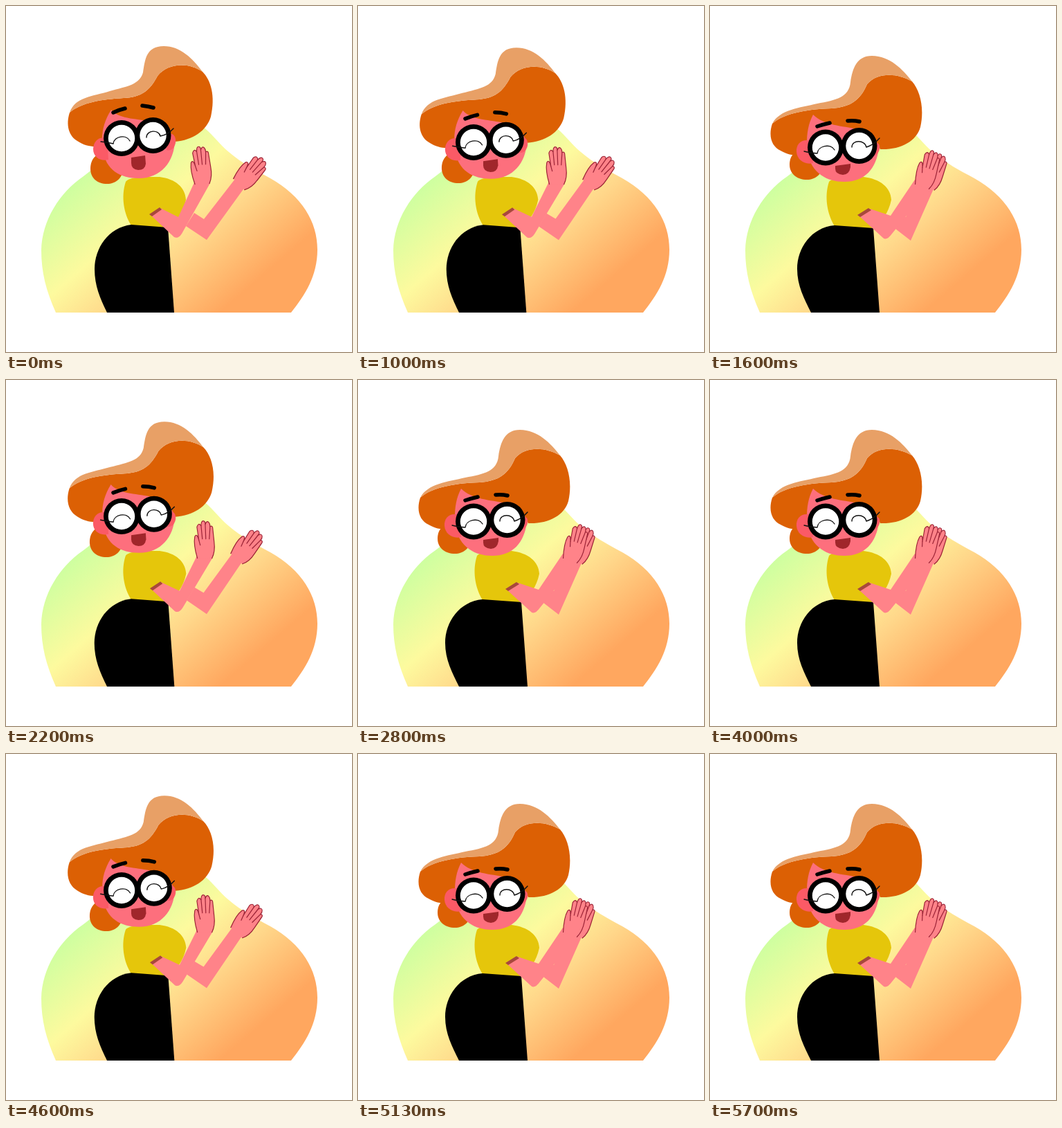
Recreate the animation shown at these times as an HTML page. Size 500 px wide and 500 px high, loop 5.73 s.

```html
<!DOCTYPE html>
<html>
<head>
<meta charset="utf-8">
<style>
html, body { margin: 0; width: 100%; height: 100%; overflow: hidden; background: #fff; }
svg { display: block; width: 100%; height: 100%; }
</style>
</head>
<body>
<svg viewBox="0 0 500 500" fill="none" stroke-linecap="round" stroke-linejoin="round">
  <linearGradient id="glow" gradientUnits="userSpaceOnUse" x1="100" y1="250" x2="295" y2="478">
    <stop offset="0" stop-color="#ccffa0"/>
    <stop offset=".35" stop-color="#fdfa9e"/>
    <stop offset=".6" stop-color="#ffd78a"/>
    <stop offset=".94" stop-color="#ffa75f"/>
  </linearGradient>
  <path fill="url(#glow)" d="M72 443C58 412 51 385 51 353C52 310 77 270 112 246C150 220 180 165 240 160C285 160 295 188 322 211C342 228 360 237 382 249C428 275 450 312 450 352C450 390 432 418 412 443Z"/>
</svg>
<script>
const svg = document.querySelector('svg');
const parts = [];
const SKIN = '#ff8389', FACE = '#fd6f7d', EAR = '#fb5a66', HAIR = '#dc6004', LINE = '#9c2437';

function add(attrs, parent = svg) {
  const el = document.createElementNS('http://www.w3.org/2000/svg', 'path');
  for (const k in attrs) el.setAttribute(k, attrs[k]);
  return parent.appendChild(el);
}

// A part blends from its open pose to its clapped pose.
const body = (fill, open, shut) => parts.push({ el: add({ fill }), attr: 'd', open, shut });
const feature = (attrs, open, shut) => parts.push({ el: add(attrs), attr: 'd', open, shut, head: true });

function hand(open, shut) {
  const g = svg.appendChild(document.createElementNS('http://www.w3.org/2000/svg', 'g'));
  add({
    d: 'M-11 0Q-17 -20 -15 -31Q-12 -37 -9 -26L-12 -45Q-10 -52 -6 -47Q-6 -54 -3 -54Q0 -54 0 -49Q2 -55 5 -52Q7 -50 7 -46Q11 -48 11 -42L13 -24Q15 -10 10 0',
    fill: SKIN, stroke: LINE, 'stroke-width': 1.2
  }, g);
  add({ d: 'M-6 -47L-4 -28M0 -49L1 -28M7 -46L6 -28M-9 -26L-7 -19', stroke: LINE, 'stroke-width': 1.2 }, g);
  parts.push({ el: g, attr: 'transform', open, shut });
}

// bun, shirt, skirt
body(HAIR, 'M122 235C122 220 132 211 146 211C160 211 169 222 169 235C169 249 158 257 146 257C132 257 122 249 122 235Z',
  'M115 229C115 214 126 206 140 206C154 206 163 216 163 229C163 243 152 251 140 251C126 251 115 243 115 229Z');
body('#e5c60b', 'M173 254C178 246 205 247 222 247C245 250 259 262 260 280C256 300 246 310 236 321L181 317C170 300 166 275 173 254Z',
  'M172 254C178 246 205 249 222 247C246 250 261 262 262 280C258 300 248 310 238 322L180 318C169 300 165 275 172 254Z');
body('#000', 'M181 316C148 320 128 350 128 380C128 404 136 423 146 443L243 443L234 320Z',
  'M180 317C146 320 126 350 126 380C126 404 136 423 146 443L245 443L236 321Z');

// face, hair, ears
body(FACE, 'M150 149C132 165 132 190 140 208C144 237 165 249 192 249C224 249 243 225 244 195C240 160 200 145 150 149Z',
  'M149 156C132 172 132 195 141 213C147 241 168 254 194 254C224 254 240 235 244 206C240 172 200 155 149 156Z');
body(HAIR, 'M92 154C86 172 91 188 103 195C112 201 120 203 129 203L139 192C139 178 143 164 152 150C165 165 192 162 212 168C232 174 240 184 244 196C270 194 290 180 296 160C303 130 296 107 284 95C264 81 234 82 219 101C208 122 196 132 170 133C138 135 110 139 92 154Z',
  'M90 170C84 188 89 203 102 209C111 214 119 216 128 216L140 198C140 184 142 170 149 157C165 173 192 173 212 178C232 183 241 193 246 207C275 208 298 196 304 175C310 148 304 123 292 109C270 96 241 96 227 113C217 137 202 146 176 148C144 149 108 154 90 170Z');
body('#e8a066', 'M92 154C100 131 125 131 150 123C175 116 193 114 198 96C201 78 202 58 228 58C252 58 270 76 284 95C264 81 234 82 219 101C208 122 196 132 170 133C138 135 110 139 92 154Z',
  'M90 170C100 150 130 147 155 141C182 136 201 132 203 110C206 90 212 72 234 72C260 72 279 92 292 109C270 96 241 96 227 113C217 137 202 146 176 148C144 149 108 154 90 170Z');
body(EAR, 'M146 191C134 188 126 196 126 207C126 218 136 225 148 222Z',
  'M146 195C133 191 124 199 125 211C126 222 136 230 149 227Z');
feature({ fill: EAR }, 'M234 184C243 183 246 190 245 198C243 206 238 210 232 208Z',
  'M236 198C244 196 246 201 245 207C243 214 239 217 234 216Z');

// glasses, eyes, brows, mouth
const rings = ['M167 191h0M212.5 187h0', 'M167 204.5h0M215.5 202h0'];
feature({ stroke: '#000', 'stroke-width': 52 }, ...rings);
feature({ stroke: '#fff', 'stroke-width': 38.5 }, ...rings);
feature({ stroke: '#111', 'stroke-width': 1.4 },
  'M137 196Q147 197 155 199C156 188 174 185 179 195M203 190C203 179 221 178 223 188Q234 186 242 177',
  'M136 210Q146 213 155 213C156 202 174 198 180 208M205 204C205 193 224 193 226 204Q236 201 245 191');
feature({ stroke: '#000', 'stroke-width': 5.5 }, 'M155 154Q163 150 172 148M197 144Q206 145 213 147',
  'M155 174Q164 171 173 169M199 166Q208 165 216 167');
feature({ fill: '#a0262b' }, 'M181 219L201 216L202 228Q201 237 191 237Q181 236 181 227Z',
  'M181 231L203 228L203 233Q201 244 192 244Q181 243 181 235Z');

// far arm, near arm
body(SKIN, 'M260 318L290 338L345 262L331 250L286 308L272 299Z', 'M268 322L290 339L325 260L304 256L283 305L275 304Z');
hand('translate(337 258)rotate(45)scale(1.08 .94)', 'translate(315 262)rotate(24)scale(1 .95)');
body(SKIN, 'M210 303L243 334Q249 337 254 329L295 256L273 253L249 305L223 292Z',
  'M216 304L250 335Q255 340 263 329L317 262L296 251L261 303L231 293Z');
body('#a8483c', 'M207 301L222 291L225 294L211 304Z', 'M213 302L229 292L233 295L217 305Z');
hand('translate(284 257)rotate(-3)', 'translate(307 261)rotate(19)');

function mix(a, b, t) {
  const num = /-?(\d+\.?\d*|\.\d+)/g, to = b.match(num);
  let i = 0;
  return a.replace(num, v => ' ' + (+v + (to[i++] - v) * t).toFixed(2));
}

function draw(now) {
  const tick = Math.floor(now % 5730 * .03 + .11) % 36;
  // the clap plays forwards, then backwards
  const q = tick > 18 ? 37 - tick : Math.max(tick, 1);
  const closing = q < 10;
  const s = closing ? (q - 1) / 9 : q > 12 ? (18 - q) / 6 : 1;
  const ease = s * s * (3 - 2 * s);
  const arms = closing ? s ** 4.6 : ease;
  const head = closing ? s ** 2 : ease;
  for (const p of parts) p.el.setAttribute(p.attr, mix(p.open, p.shut, p.head ? head : arms));
  requestAnimationFrame(draw);
}
draw(performance.now());
</script>
</body>
</html>
```
